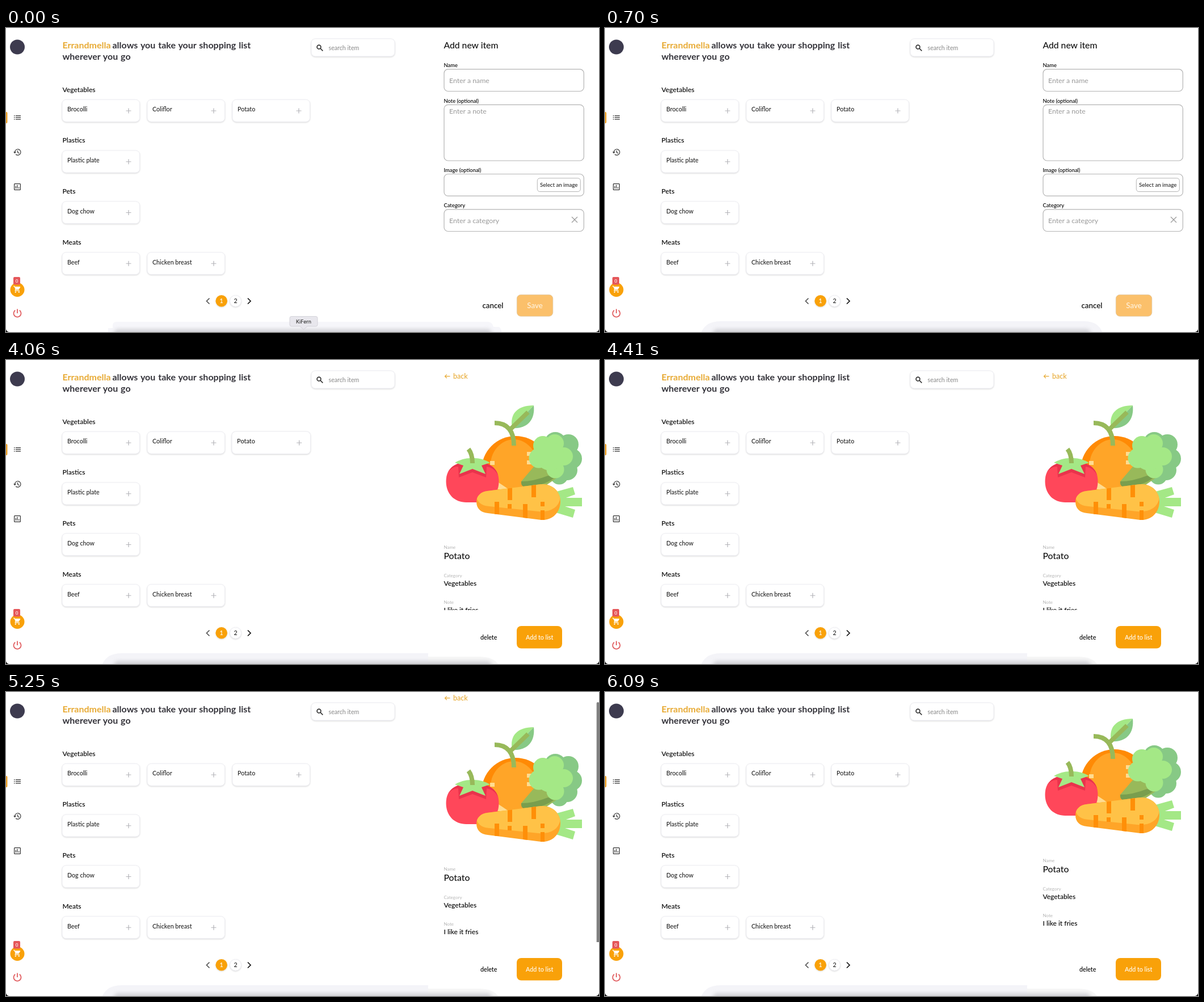
These frames come from a looping animation (1045 by 536 pixels, 8000 ms). An HTML page:

```html
<!DOCTYPE html>
<html lang="en">
<head>
<meta charset="utf-8">
<title>Shopping list</title>
<style>
  html, body { margin: 0; width: 100%; height: 100%; overflow: hidden; background: #fff; }
  svg { display: block; }
  text { font: 500 10.7px Lato, sans-serif; fill: #222; }
  .title { font-size: 16px; font-weight: 700; fill: #34333a; word-spacing: 1px; }
  .title.brand, .back text { fill: #e8ab36; }
  .head { font-size: 15.7px; fill: #111; }
  .section { font-size: 12.1px; fill: #000; }
  .label { font-size: 9.4px; fill: #000; }
  .hint { font-size: 12.3px; font-weight: 400; fill: #999; }
  .small { font-size: 8px; font-weight: 400; fill: #b5b5b5; }
  .value { font-size: 12px; fill: #000; }
  .action { font-size: 13.3px; fill: #000; }
  .mid { text-anchor: middle; }
  .white { fill: #fff; }
  .tip text { font: 500 8.8px Inter, sans-serif; fill: #333; }
  .box { fill: #fff; stroke: #ededf2; filter: drop-shadow(0 1.3px 1.2px rgba(0,0,0,.15)); }
  .field { fill: #fff; stroke: #b4b4b4; stroke-width: 1.2; }
  .line { fill: none; stroke: #333; stroke-width: 1.2; }
  .thick { stroke-width: 1.7; }

  .anim { animation: 8s step-end infinite; }
  .tip { animation-name: tip; }
  .dock0 { animation-name: early; }
  .dock1 { animation-name: late; }
  .form { animation-name: form; }
  .detail { animation-name: detail; }
  .hover { animation-name: hover; transform-box: fill-box; transform-origin: center; }
  .scroll { animation-name: scroll; }
  .thumb { animation-name: thumb; }
  @keyframes tip {
    0% { transform: none; }
    .875% { transform: translateY(10px); }
    1.75% { transform: translateY(20px); }
    2.625%, 100% { transform: translateY(40px); }
  }
  @keyframes early { 0% { opacity: 1; } 1.75%, 100% { opacity: 0; } }
  @keyframes late { 0% { opacity: 0; } 1.75%, 100% { opacity: 1; } }
  @keyframes form { 0% { visibility: visible; } 50.75%, 100% { visibility: hidden; } }
  @keyframes detail { 0% { visibility: hidden; } 50.75%, 100% { visibility: visible; } }
  @keyframes hover {
    0% { transform: none; }
    35.875% { transform: scale(1.015); }
    55.125%, 100% { transform: none; }
  }
  @keyframes scroll {
    0% { transform: none; }
    64.75% { transform: translateY(-1.2px); }
    65.625% { transform: translateY(-18px); }
    66.5%, 100% { transform: translateY(-33px); }
  }
  @keyframes thumb {
    0% { opacity: 0; transform: none; }
    64.75% { opacity: 1; transform: none; }
    65.625% { opacity: 1; transform: translateY(16px); }
    66.5% { opacity: 1; transform: translateY(31px); }
    74.375% { opacity: .66; transform: translateY(31px); }
    75.25% { opacity: .3; transform: translateY(31px); }
    76.125%, 100% { opacity: 0; transform: translateY(31px); }
  }
</style>
</head>
<body>
<svg width="1045" height="536" viewBox="0 0 1045 536">
  <defs>
    <clipPath id="pane"><rect x="740" width="305" height="441"/></clipPath>
    <path id="fruit" d="M775.5 214C775.5 190 792 179 822 179S868.500 190 868.500 214C868.500 237 853 251 833 251H811C791 251 775.500 237 775.500 214Z"/>
    <clipPath id="tomato"><use href="#fruit"/></clipPath>
    <clipPath id="orange"><circle cx="898" cy="194" r="60"/></clipPath>
    <path id="root" d="M848 231L943 219C962 218 977 231 977 249C977 270 962 283 943 282L849 270C836 269 829 261 829 250C829 240 837 232 848 231Z"/>
    <clipPath id="carrot"><use href="#root"/></clipPath>
    <filter id="soft" x="-5%" y="-100%" width="110%" height="300%"><feGaussianBlur stdDeviation="3"/></filter>
  </defs>

  <!-- Sidebar -->
  <circle cx="20" cy="33.5" r="13" fill="#3d3b4f"/>
  <path d="M0 148h.5a2 2 0 0 1 2 2v16a2 2 0 0 1-2 2H0z" fill="#f0a42a"/>
  <path class="line" d="M17 154.600h9M17 157.700h9M17 160.800h9M14 154.600h1.600M14 157.700h1.600M14 160.800h1.600"/>
  <path class="line" d="M15.600 219a5.200 5.200 0 1 1 1.600 3.700M20.600 216v3.300l2.700 1.600"/>
  <path d="M13 218.500h5l-2.500 2.700z" fill="#333"/>
  <rect class="line" x="14.600" y="274.600" width="10.800" height="10.800" rx="1"/>
  <path class="line" d="M17.300 278.600v4.400M20 276.800v6.200M22.700 280.800v2.200"/>
  <circle cx="20" cy="461.500" r="12.500" fill="#f9a109"/>
  <path transform="translate(12.600 453.600) scale(.6)" fill="#fff" d="M15.600 13c.7 0 1.400-.4 1.700-1l3.600-6.500c.4-.7-.1-1.500-.9-1.500H5.200l-.9-2H1v2h2l3.600 7.600-1.400 2.400C4.500 15.400 5.500 17 7 17h12v-2H7l1.100-2zM7 18a2 2 0 1 0 0 4a2 2 0 0 0 0-4zM17 18a2 2 0 1 0 0 4a2 2 0 0 0 0-4z"/>
  <rect x="13" y="439" width="12" height="13.500" rx="2" fill="#e5575a"/>
  <text class="mid white" x="19" y="448.700" style="font-size:8px">0</text>
  <path class="line thick" d="M16.200 497.800a6.500 6.500 0 1 0 7.600 0M20 495.500v7.500" style="stroke:#e0575a"/>

  <!-- Heading and search -->
  <text class="title brand" x="99.500" y="35.700">Errandmella</text>
  <text class="title" x="187.500" y="35.700">allows you take your shopping list</text>
  <text class="title" x="99.500" y="55.500">wherever you go</text>
  <rect class="box" x="538" y="19" width="147" height="31" rx="7"/>
  <circle class="line thick" cx="551.500" cy="33.500" r="3.400"/>
  <path class="line thick" d="M554 36l4.300 4.300"/>
  <text x="568.500" y="38.700" style="fill:#888;font-weight:400">search item</text>

  <g id="list"></g>

  <!-- Pages -->
  <path class="line thick" d="M358.500 476.500l-5 5 5 5" style="stroke:#555"/>
  <path class="line thick" d="M426 476.500l5 5-5 5" style="stroke:#111"/>
  <circle class="box" cx="379.700" cy="481.300" r="10.300" style="fill:#f9a109;stroke:none"/>
  <circle class="box" cx="404.500" cy="481.300" r="10"/>
  <text class="mid white" x="379.700" y="485">1</text>
  <text class="mid" x="404.500" y="485">2</text>

  <!-- Dock -->
  <path class="anim dock0" fill="#f6f6fa" d="M188 536V523Q189 518 196 518H848Q857 518 859 527H869Q873 530 873 536H180V529H188Z"/>
  <path class="anim dock1" fill="#f4f4f8" d="M170 536Q178 517 204 517H844Q869 517 876 536Z"/>
  <g class="anim detail">
    <path d="M744 512H880V536H744Z" fill="#fff"/>
    <path d="M744 523H835Q859 524 867 536H744Z" fill="#f6f6f6"/>
  </g>
  <rect x="190" y="531" width="666" height="16" rx="8" fill="#d2d2d7" filter="url(#soft)"/>
  <g class="anim tip">
    <path d="M503 508.500H546a3 3 0 0 1 3 3V523a3 3 0 0 1-3 3H531L524.500 531.500 518 526H503a3 3 0 0 1-3-3V511.500a3 3 0 0 1 3-3z" fill="#e8e7ed" stroke="#cdccd4" stroke-width=".8"/>
    <text class="mid" x="524.500" y="520.700">KiFern</text>
  </g>

  <!-- New item form -->
  <g class="anim form">
    <text class="head" x="771.500" y="35.500">Add new item</text>
    <text class="label" x="771.500" y="69.200">Name</text>
    <rect class="field" x="772" y="72.700" width="246.300" height="38.800" rx="7"/>
    <text class="hint" x="781" y="96.800">Enter a name</text>
    <text class="label" x="771.500" y="131.500">Note (optional)</text>
    <rect class="field" x="772" y="135.300" width="246.300" height="98.700" rx="7"/>
    <text class="hint" x="781" y="151.300">Enter a note</text>
    <text class="label" x="771.500" y="253.700">Image (optional)</text>
    <rect class="field" x="772" y="257.500" width="246.300" height="38.700" rx="7"/>
    <rect class="field" x="936.300" y="264.800" width="76" height="23.700" rx="4.500" style="stroke-width:1"/>
    <text class="mid" x="974.200" y="280" style="font-size:9.700px">Select an image</text>
    <text class="label" x="771.500" y="316">Category</text>
    <rect class="field" x="772" y="319.800" width="246.300" height="38.700" rx="7"/>
    <text class="hint" x="781" y="343.500">Enter a category</text>
    <path class="line" d="M997 333l10 10m0-10l-10 10" style="stroke:#999"/>
    <text class="action" x="839.500" y="494">cancel</text>
    <rect x="900.300" y="470.300" width="63.500" height="38" rx="7" fill="#fbc06b" stroke="#dcc6a4" stroke-width=".7"/>
    <text class="mid action" x="932" y="494.200" style="fill:#fff3df">Save</text>
  </g>

  <!-- Item detail -->
  <g class="anim detail">
    <g clip-path="url(#pane)">
      <g class="anim scroll">
        <g class="back">
          <path class="line" d="M782.500 28.700H773.500m3.300-3.300l-3.300 3.300 3.300 3.300" style="stroke:#e8ab36"/>
          <text x="788" y="33" style="font-size:12.500px">back</text>
        </g>

        <!-- Orange -->
        <circle cx="898" cy="194" r="60" fill="#ff8a05"/>
        <g clip-path="url(#orange)">
          <ellipse cx="895" cy="189" rx="42" ry="49" fill="#ffa528"/>
          <path d="M853 178h8v7h-8zM918 162h8v7h-8zM918 177h8v7h-8zM868 216L886 228H862z" fill="#ffdc91"/>
        </g>
        <path d="M930 80C901 80 887 95 892 120Z" fill="#a4e886"/>
        <path d="M930 80C933 106 918 122 892 120Z" fill="#87c985"/>
        <path d="M861 111C883 111 895 124 895 151M889 122L920 92" fill="none" stroke="#98b95a" stroke-width="8"/>

        <!-- Broccoli -->
        <g fill="#87c985">
          <circle cx="968" cy="146" r="19"/><circle cx="991" cy="149" r="18"/>
          <circle cx="997" cy="174" r="18"/><circle cx="989" cy="194" r="18"/>
          <circle cx="975" cy="204" r="15.500"/><circle cx="970" cy="175" r="28"/>
        </g>
        <path d="M937 180L908 214Q908 223 920 223L950 222 972 207 958 190Z" fill="#98b95a"/>
        <path d="M908 214Q930 214 955 204L967 207Q948 223 912 223Q907 221 908 214Z" fill="#799e4e"/>
        <g fill="#a4e886">
          <circle cx="946" cy="151" r="17"/><circle cx="967" cy="147" r="16"/>
          <circle cx="983" cy="170" r="16"/><circle cx="968" cy="193" r="15.500"/>
          <circle cx="939" cy="173" r="17.500"/><circle cx="959" cy="170" r="25"/>
        </g>

        <!-- Tomato -->
        <use href="#fruit" fill="#ff475a"/>
        <path clip-path="url(#tomato)" d="M775 205Q782 188 797 188L798 207 822 198 846 207 847 188Q862 190 869 207V170H775Z" fill="#e9334c"/>
        <path d="M791 181Q806 172 822 173Q838 172 853 181L838 186 845 201 822 192 799 201 806 186Z" fill="#a4e886"/>
        <path d="M815 157Q822 166 822 182" fill="none" stroke="#98b95a" stroke-width="8"/>

        <!-- Carrot -->
        <path d="M970 232L999 224 1003 237 976 247ZM974 243H1015V258H974ZM976 255L1003 264 999 278 969 269Z" fill="#a4e886"/>
        <use href="#root" fill="#ffa528"/>
        <g clip-path="url(#carrot)">
          <path d="M829 243Q834 257 852 258L938 267Q971 269 977 244V215H829Z" fill="#ffc247"/>
          <path d="M884 222h8v25h-8zM926 218h8v24h-8zM861 250h8v22h-8zM884 254h7v8h-7zM911 254h8v25h-8zM942 250h7v8h-7zM942 265h7v18h-7z" fill="#ff8f08"/>
        </g>

        <text class="small" x="771.500" y="332.700">Name</text>
        <text class="head" x="771.500" y="350.500">Potato</text>
        <text class="small" x="771.500" y="382.500">Category</text>
        <text class="value" x="771.500" y="397.700">Vegetables</text>
        <text class="small" x="771.500" y="430">Note</text>
        <text class="value" x="771.500" y="445">I like it fries</text>
      </g>
      <rect class="anim thumb" x="1040.700" y="2" width="4.600" height="460" rx="2" fill="#808080"/>
    </g>
    <text x="836" y="492.700" style="fill:#000">delete</text>
    <rect x="900" y="469" width="80" height="39.500" rx="8" fill="#f9a109"/>
    <text class="mid white" x="940.200" y="492.700">Add to list</text>
  </g>

  <!-- Window corners -->
  <path d="M0 531Q1 535 5 536H0ZM1045 531Q1044 535 1040 536H1045Z" fill="#111"/>
</svg>
<script>
  const sections = {
    Vegetables: ["Brocolli", "Coliflor", "Potato"],
    Plastics: ["Plastic plate"],
    Pets: ["Dog chow"],
    Meats: ["Beef", "Chicken breast"]
  };

  const card = (name, x, y) => `
    <g class="${name === "Potato" ? "anim hover" : ""}">
      <rect class="box" x="${x}" y="${y}" width="136.5" height="39" rx="7"/>
      <text x="${x + 9}" y="${y + 21}">${name}</text>
      <path d="M${x + 112.5} ${y + 19.7}h9m-4.5-4.5v9" stroke="#b3b3b8" stroke-width="1.2"/>
    </g>`;

  document.getElementById("list").innerHTML = Object.entries(sections).map(([title, items], row) => {
    const y = 126.3 + row * 89.75;
    return `<text class="section" x="99.5" y="${y - 13.7}">${title}</text>` +
      items.map((name, col) => card(name, 99 + col * 150, y)).join("");
  }).join("");
</script>
</body>
</html>
```
